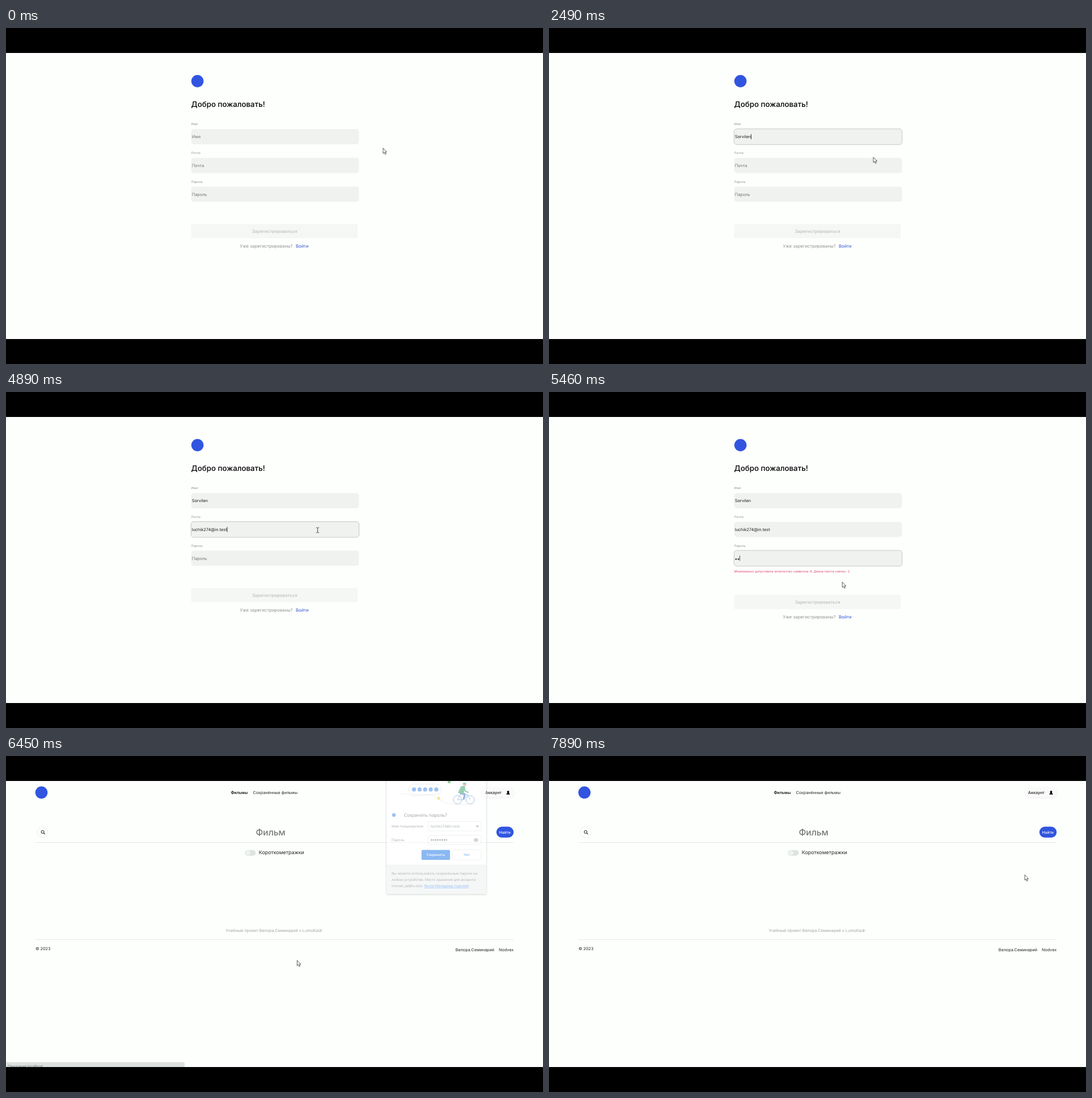
An HTML page that plays this animation: 947x592 px, repeating every 7.92 s.

```html
<!DOCTYPE html>
<html lang="ru">
<head>
<meta charset="utf-8">
<title>Регистрация</title>
<style>
  html, body { margin: 0; width: 100%; height: 100%; overflow: hidden; background: #000; }
  svg { display: block; width: 100%; height: 100%; }
  text { font: 400 7.21px Inter, sans-serif; fill: #222; text-rendering: geometricPrecision; white-space: pre; }
  .mid { text-anchor: middle; }
  .end { text-anchor: end; }
  .medium { font-weight: 500; }
  .title { font-size: 13.315px; font-weight: 500; fill: #000; }
  .label { font-size: 5.548px; fill: #8f948f; }
  .value { font-size: 7.397px; }
  .error { font-size: 5.548px; fill: #e0446c; }
  .action { font-size: 7.767px; }
  .muted { fill: #8f948f; }
  .link { fill: #3456d6; }
  .rule { stroke: #e0eae2; }
  #popup text, #status text { font: 6.2px "Open Sans", "Noto Sans", sans-serif; fill: #5f6368; }
  #popup .head { font-size: 8px; fill: #3c4043; }
  #popup .button { font-weight: 600; font-size: 6px; fill: #1a73e8; }
  #popup { filter: drop-shadow(0 1px 1.5px rgba(0, 0, 0, .3)); }
</style>
</head>
<body>
<svg id="stage" viewBox="0 0 947 592" preserveAspectRatio="none">
  <defs><filter id="soft" x="-20%" y="-40%" width="140%" height="180%"><feGaussianBlur stdDeviation="1.6"/></filter></defs>
  <rect y="43" width="947" height="506" fill="#fdfffd"/>

  <g id="signup">
    <circle cx="337.6" cy="93.6" r="10.8" fill="#3155e0"/>
    <text class="title" x="326.6" y="139.2">Добро пожаловать!</text>
    <g id="fields"></g>
    <g id="actions">
      <rect id="submit" x="326.6" y="345.5" width="293.4" height="25" rx="1.6"/>
      <text id="submitText" class="action medium mid" x="473.6" y="360.8">Зарегистрироваться</text>
      <text class="action muted" x="412.6" y="386.8">Уже зарегистрированы?</text>
      <text class="action link" x="511" y="386.8">Войти</text>
    </g>
  </g>

  <g id="films">
    <circle cx="62.5" cy="64.3" r="10.8" fill="#3155e0"/>
    <text class="medium" x="396.4" y="67.1" style="fill:#000">Фильмы</text>
    <text x="435.4" y="67.1">Сохранённые фильмы</text>
    <rect x="839" y="56" width="57" height="18" rx="9" fill="#eceeec" filter="url(#soft)"/>
    <rect x="839" y="55" width="57" height="18" rx="9" fill="#f9faf9"/>
    <text class="medium" x="844.8" y="67.1">Аккаунт</text>
    <path d="M885.5 61.3a1.9 1.9 0 0 1 1.9 2q0 1.6-.9 2.2l2 .8v1.5h-6v-1.5l2-.8q-.9-.6-.9-2.2a1.9 1.9 0 0 1 1.9-2Z" fill="#000"/>

    <circle cx="64.7" cy="134.2" r="9.4" fill="#fff" stroke="#e3e8e4" stroke-width=".8"/>
    <path d="M66.5 135.7l2.2 2.2" stroke="#111" stroke-width="1.1"/>
    <circle cx="64.6" cy="133.8" r="2.5" fill="none" stroke="#111" stroke-width="1"/>
    <text class="medium mid" x="466.6" y="139.8" style="font-size:15.53px;fill:#757975">Фильм</text>
    <rect x="864.8" y="124.6" width="30.4" height="19.2" rx="9.6" fill="#3155e0"/>
    <text class="medium mid" x="879.8" y="136.6" style="font-size:6.66px;fill:#fff">Найти</text>
    <path class="rule" d="M52 152.5H895"/>
    <rect x="421.5" y="165.7" width="18.8" height="10" rx="5" fill="#dfe4e0"/>
    <circle cx="427" cy="170.7" r="4" fill="#eff3f0"/>
    <text x="445.8" y="173.2" style="font-size:8.88px">Короткометражки</text>

    <text class="mid" x="473.5" y="310.3" style="fill:#a0a4a0">Учебный проект Велора.Семинарий x LumoKadr.</text>
    <path class="rule" d="M52 323.5H895"/>
    <text x="52" y="342.4">© 2023</text>
    <text x="792.8" y="343.6">Велора.Семинарий</text>
    <text class="end" x="895.2" y="343.6">Nodvex</text>
  </g>

  <g id="status">
    <rect x="-4" y="534" width="319" height="20" rx="2" fill="#dce1de"/>
    <text x="3" y="543" style="fill:#555;font-size:6.5px">Ожидание localhost...</text>
  </g>

  <g id="popup">
    <rect x="671" y="38" width="176" height="205" rx="2" fill="#fff" stroke="#d5d8da" stroke-width=".6"/>
    <path d="M671.3 192H846.7V241a2 2 0 0 1-2 2H673.3a2 2 0 0 1-2-2Z" fill="#eff1f2"/>
    <path d="M671.3 192H846.7" stroke="#dadce0" stroke-width=".6"/>
    <path d="M695 67C708 64 714 73 729 70S752 69 763 76 779 85 797 85H827" fill="none" stroke="#dadce0" stroke-width=".8"/>
    <rect x="710.5" y="49.4" width="57.6" height="18.6" rx="9.3" fill="#fff" stroke="#cfd3d8" stroke-width=".8"/>
    <g id="pillDots" fill="#4285e8"></g>
    <path d="M763 71l3.2 3.4-3.2 3.4-3.2-3.4Z" fill="#fbc02d"/>
    <rect x="779" y="43" width="5" height="5" rx="1" fill="#34a853"/>
    <g fill="none" stroke="#5b8fd6">
      <circle cx="796.3" cy="77" r="7.4"/><circle cx="818.6" cy="77" r="7.4"/>
      <path d="M796.3 77l5-9h13l-8 9h-10M814.3 68l4.3 9M814 65l2.5-1"/>
    </g>
    <path d="M800 65l9 2-2 10" fill="none" stroke="#3c6db5" stroke-width="3" stroke-linejoin="round"/>
    <path d="M797 65l5-11q5-3 8 1l-3 11Z" fill="#34a06a"/>
    <path d="M808 56l2 6 5 2" fill="none" stroke="#34a06a" stroke-width="2"/>
    <circle cx="809" cy="50.5" r="2.6" fill="#c98f78"/>
    <path d="M805 50q1-4 5-3l2.5 2Z" fill="#34a06a"/>

    <circle cx="684" cy="104" r="3.2" fill="#4285e8"/>
    <text class="head" x="701.8" y="107">Сохранить пароль?</text>
    <text x="680" y="126">Имя пользователя</text>
    <text x="680" y="150">Пароль</text>
    <g fill="#fff" stroke="#dadce0" stroke-width=".7">
      <rect x="744.5" y="115.5" width="93.5" height="16.5" rx="1.5"/>
      <rect x="744.5" y="139.5" width="93.5" height="16.5" rx="1.5"/>
      <rect x="787.5" y="165.5" width="50.5" height="17.5" rx="1.6"/>
    </g>
    <text x="749" y="126">luchik274@in.test</text>
    <path d="M828.8 122.8h5l-2.5 2.7Z" fill="#5f6368"/>
    <g id="savedDots" fill="#3c4043"></g>
    <path d="M825 148q4-5 8 0-4 5-8 0Z" fill="none" stroke="#5f6368"/><circle cx="829" cy="148" r="1.3" fill="#5f6368"/>
    <rect x="732.8" y="165.5" width="50.2" height="17.5" rx="1.6" fill="#1a73e8"/>
    <text class="button mid" x="757.9" y="176.4" style="fill:#fff">Сохранить</text>
    <text class="button mid" x="812.7" y="176.4">Нет</text>
    <text x="680" y="209">Вы можете использовать сохраненные пароли на</text>
    <text x="680" y="220">любом устройстве. Место хранения для аккаунта</text>
    <text x="680" y="231">morvel_qd@in.test: <tspan fill="#1a73e8" text-decoration="underline">Nivola Менеджер паролей</tspan>.</text>
  </g>

  <path d="M0 0H947V44H0ZM0 548H947V592H0Z"/>

  <g id="cursor" stroke-linejoin="round">
    <path id="arrow" d="M0 0V9.4L2.1 7.5 3.7 11 5.2 10.3 3.7 7H6.6Z" fill="#fff" stroke="#333" stroke-width=".8"/>
    <path id="beam" d="M-2.6-4.5Q-.3-4.5 0-3.6 .3-4.5 2.6-4.5M0-3.8V3.8M-2.6 4.5Q-.3 4.5 0 3.6 .3 4.5 2.6 4.5" fill="none" stroke="#333" stroke-width=".9"/>
    <path id="hand" d="M-1 .8Q0-.8 1 .8V4.6Q2.4 3.4 2.8 4.8 4 3.6 4.4 5.2 5.8 4.4 6 6V9.5L4.8 13.2H-.8L-4.2 8.4Q-4.2 6.6-2.6 7.4L-1 8.8Z" fill="#fff" stroke="#333" stroke-width=".8"/>
  </g>
</svg>
<script>
const LOOP = 7920, TICK = 30, ERROR_HEIGHT = 12.1, DOT_STEP = 4.07;
const ENABLED_AT = 5970, NAVIGATE_AT = 6300;
const $ = id => document.getElementById(id);

const tooShort = (min, n) => `Минимально допустимое количество символов: ${min}. Длина текста сейчас: ${n}.`;
const fields = [
  { name: 'Имя', text: 'Sorvilen', focus: 630,
    keys: [1320, 1590, 2040, 2100, 2160, 2220, 2280, 2430],
    validate: n => n === 1 ? tooShort(2, n) : '' },
  { name: 'Почта', text: 'luchik274@in.test', focus: 2670,
    keys: [3360, 3420, 3480, 3570, 3660, 3840, 3930, 4080, 4140, 4350, 4410, 4470, 4530, 4590, 4680, 4740, 4890],
    validate: n => n && n < 17 ? 'Некорректный формат email' : '' },
  { name: 'Пароль', secret: true, focus: 5130,
    keys: [5370, 5430, 5520, 5580, 5670, 5760, 5850, ENABLED_AT],
    validate: n => n && n < 8 ? tooShort(8, n) : '' }
];

// time, x, y of the pointer's hot spot
const pointerPath = [
  [0, 665, 211.6], [30, 665, 211.6], [60, 664.6, 211.3], [210, 664.6, 211.3],
  [600, 582, 193], [2400, 582, 193], [2490, 572, 227.6], [2640, 549.6, 243.4],
  [4890, 549.6, 243.4], [5100, 533, 293], [5190, 533, 293], [5430, 517.2, 334.8],
  [5640, 517.2, 334.8], [5880, 515.4, 360.5], [6240, 515.4, 360.5], [6420, 513.4, 360],
  [6780, 513.4, 360], [7140, 812, 175], [7260, 812, 175], [7530, 838.6, 209.2],
  [7590, 838.6, 209.2], [7620, 839, 209.4], [LOOP, 839, 209.4]
];

const clamp = v => Math.max(0, Math.min(1, v));
const ramp = (t, from, to) => clamp((t - from) / (to - from));
const mix = (a, b, k) => a + (b - a) * k;
const mixColor = (a, b, k) => `rgb(${a.map((v, i) => Math.round(mix(v, b[i], k)))})`;
const show = (el, on) => { el.style.display = on ? '' : 'none'; };
const dots = (count, x, y, step, r) =>
  Array.from({ length: count }, (_, i) => `<circle cx="${x + step * i}" cy="${y}" r="${r}"/>`).join('');

$('pillDots').innerHTML = dots(5, 719.5, 58.9, 9.83, 3.6);
$('savedDots').innerHTML = dots(8, 750.5, 148, 3.72, 1.15);

fields.forEach((field, i) => {
  const top = field.top = 178.1 + 50.7 * i;
  const g = field.group = document.createElementNS('http://www.w3.org/2000/svg', 'g');
  g.innerHTML = `
    <text class="label" x="326.6" y="${top - 7}">${field.name}</text>
    <rect x="326.6" y="${top}" width="295.8" height="26.8" rx="4.4" fill="#eff2ef"/>
    <rect class="ring" x="326.3" y="${top - .4}" width="296.4" height="27.6" rx="4.8" fill="none" stroke="#b4bab6" stroke-width=".8"/>
    <text class="value" x="327.7" y="${top + 16}"></text>
    <g class="dots" fill="#222"></g>
    <rect class="caret" y="${top + 8.9}" width=".8" height="9" fill="#111"/>
    <text class="error" x="326.6" y="${top + 38.2}"></text>`;
  for (const part of ['ring', 'value', 'dots', 'caret', 'error']) field[part] = g.querySelector('.' + part);
  $('fields').append(g);
});

function pointerAt(t) {
  const i = pointerPath.findIndex(p => p[0] > t);
  const [t0, x0, y0] = pointerPath[i - 1], [t1, x1, y1] = pointerPath[i];
  const k = ramp(t, t0, t1), eased = k * k * (3 - 2 * k);
  return [mix(x0, x1, eased), mix(y0, y1, eased)];
}

function drawForm(t) {
  let shift = 0;
  const active = fields.filter(f => f.focus <= t).pop();
  for (const field of fields) {
    const typed = field.keys.filter(k => k <= t);
    const n = typed.length, focused = field === active, message = field.validate(n);
    field.shift = shift;
    field.group.setAttribute('transform', `translate(0 ${shift})`);
    field.value.textContent = n ? (field.secret ? '' : field.text.slice(0, n)) : field.name;
    field.value.style.fill = n ? '#222' : '#757975';
    field.dots.innerHTML = field.secret ? dots(n, 329.8, field.top + 15, DOT_STEP, 1.25) : '';
    const width = !n ? 0 : field.secret ? n * DOT_STEP : field.value.getComputedTextLength();
    const lastInput = n ? typed[n - 1] : field.focus;
    field.caret.setAttribute('x', 327.7 + width);
    show(field.caret, focused && (t - lastInput) % 1000 < 500);
    show(field.ring, focused);
    field.error.textContent = message;
    if (message) shift += ERROR_HEIGHT;
  }
  $('actions').setAttribute('transform', `translate(0 ${shift})`);
  const k = ramp(t, ENABLED_AT + 30, ENABLED_AT + 430);
  $('submit').style.fill = mixColor([244, 247, 244], [49, 85, 224], k);
  $('submitText').style.fill = mixColor([188, 192, 188], [255, 255, 255], k);
}

function drawPointer(t) {
  const [x, y] = pointerAt(t), onForm = t < NAVIGATE_AT;
  const beam = onForm && x > 326 && x < 622.4 &&
    fields.some(f => y > f.top + f.shift && y < f.top + f.shift + 26.8);
  const hand = onForm && t >= ENABLED_AT && y > 345.5;
  show($('beam'), beam);
  show($('hand'), hand);
  show($('arrow'), !beam && !hand);
  $('cursor').setAttribute('transform', `translate(${x} ${y})`);
}

function draw(t) {
  const onForm = t < NAVIGATE_AT;
  show($('signup'), onForm);
  show($('films'), !onForm);
  if (onForm) drawForm(t);
  const popup = ramp(t, 6390, 6510) - ramp(t, 7230, 7380);
  show($('popup'), popup > 0);
  $('popup').style.opacity = popup;
  const raised = ramp(t, 6390, 6490) - ramp(t, 6540, 6630);
  show($('status'), raised > 0);
  $('status').setAttribute('transform', `translate(0 ${14 * (1 - raised)})`);
  drawPointer(t);
}

function tick() {
  const t = performance.now() % LOOP;
  draw(Math.floor(t / TICK) * TICK);
  requestAnimationFrame(tick);
}
tick();
</script>
</body>
</html>
```
